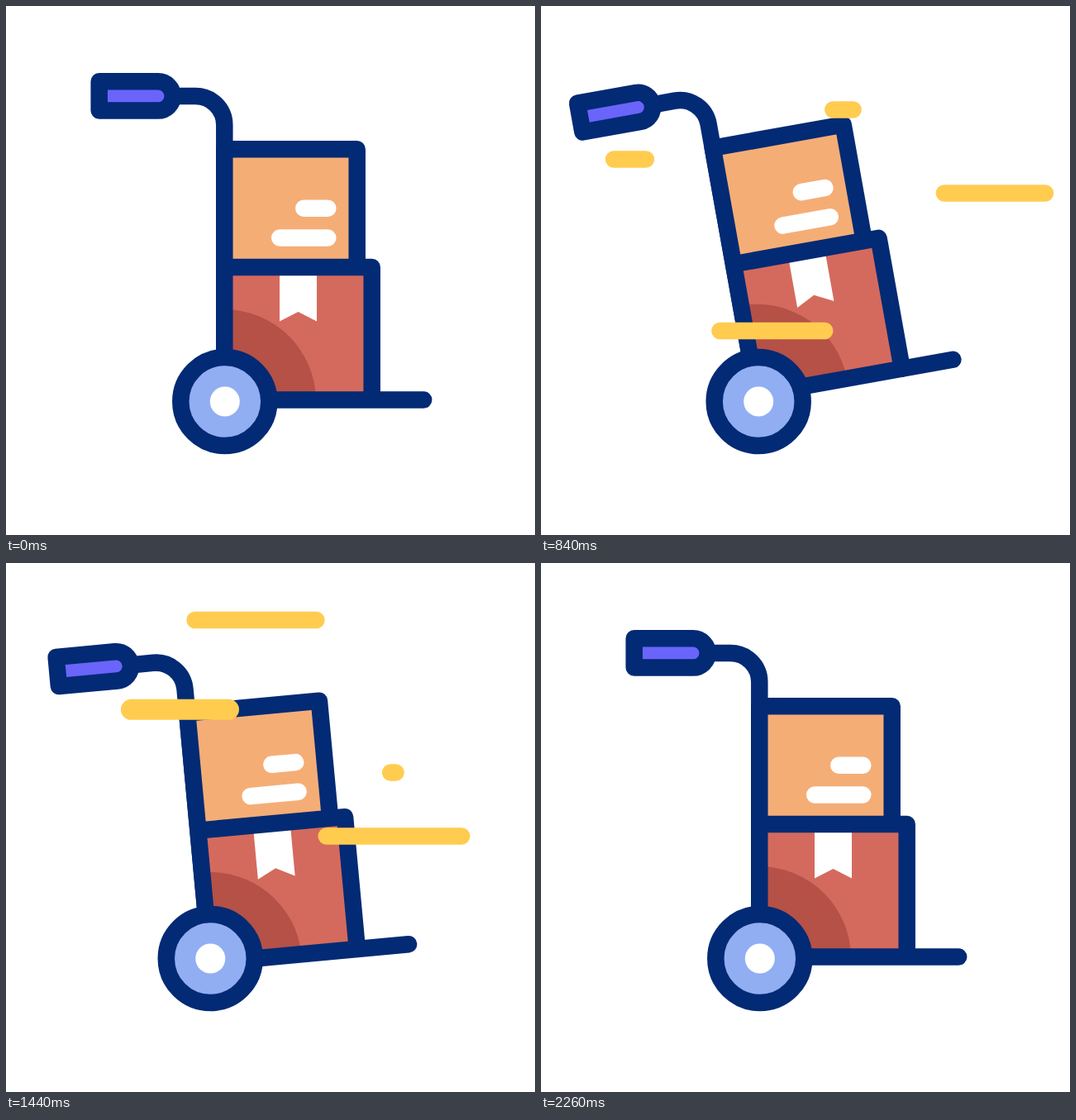
Write an HTML page that moves like this. It is 640 px wide and 640 px high and loops after 2400 ms.

```html
<!DOCTYPE html>
<html lang="en">
<head>
<meta charset="utf-8">
<title>Hand truck</title>
<style>
  html, body { margin: 0; height: 100%; overflow: hidden; background: #fff; }
  svg { display: block; width: 100%; height: 100%; }
  .outline { stroke: #032a74; stroke-width: 20.5; stroke-linecap: round; stroke-linejoin: round; }
  .label { stroke: #fff; stroke-width: 20.5; stroke-linecap: round; }
  #streaks { stroke: #ffcc50; stroke-linecap: round; }
</style>
</head>
<body>
<svg viewBox="0 0 640 640">
  <g id="cart" fill="none">
    <path class="outline" d="M211 109H229A35 35 0 0 1 264.3 144V440"/>
    <path class="outline" fill="#6a64fb" d="M112.7 91.2H184A17.7 17.7 0 0 1 184 126.6H112.7Z"/>
    <path fill="#f5ad76" d="M264.3 173.3H424.7V316H264.3Z"/>
    <path class="label" d="M360.3 244.7H389.3M331.2 280.5H389.3"/>
    <path fill="#d46a5d" d="M264.3 316H442.7V476.5H264.3Z"/>
    <path fill="#b55147" d="M264.3 367A111 111 0 0 1 375 476.5H264.3Z"/>
    <path fill="#fff" d="M331 316H376V381.5L353.5 370L331 381.5Z"/>
    <path class="outline" d="M264.3 173.3H424.7V316M264.3 316H442.7V476.5M264.3 173.3V476.5H505.2"/>
  </g>
  <g id="wheel">
    <circle class="outline" r="53.5" fill="#91aef2"/>
    <circle r="18" fill="#fff"/>
  </g>
  <g id="streaks"></g>
</svg>
<script>
const LOOP = 2400, AXLE_X = 264.8, AXLE_Y = 478.5;
const STREAK_LENGTH = 202, TAIL_DELAY = 250;
const cart = document.getElementById('cart');
const wheel = document.getElementById('wheel');
const streakLayer = document.getElementById('streaks');

// Turning points: [ms, value]
const roll = [[0, AXLE_X], [580, 220.5], [1060, 295.6], [1640, 230], [2220, AXLE_X]];
const bounce = [[0, 0], [460, 11], [1010, -11.3], [1400, 7.5], [1740, -8], [2220, 0]];

const ramp = (t, from, to) => Math.min(1, Math.max(0, (t - from) / (to - from)));
const ease = p => (1 - Math.cos(Math.PI * p)) / 2;

// Swing from each turning point to the next
function swing(points, t) {
  return points.slice(1).reduce(
    (sum, [time, value], i) => sum + (value - points[i][1]) * ease(ramp(t, points[i][0], time)),
    points[0][1]);
}

// Tip back, hold, then settle with a long tail
function tilt(t) {
  return 10.15 * (ease(ramp(t, 0, 850) ** 0.9) - ease(ramp(t, 1030, 2220) ** 0.68));
}

// y, right end, start, travel time, thickness
const streaks = [
  [125.5, 555.3, 258, 430],
  [185.5, 290, 264, 460],
  [393, 396, 398, 565],
  [226.5, 612, 560, 490],
  [69, 379, 1154, 433],
  [177.3, 273, 1147, 520, 25],
  [330.5, 562, 1130, 410],
  [253.5, 471.5, 1390, 450]
].map(([y, right, start, travel, width = 20.5]) => {
  const el = document.createElementNS('http://www.w3.org/2000/svg', 'path');
  el.setAttribute('stroke-width', width);
  streakLayer.append(el);
  return { el, y, right, start, travel };
});

function draw(t) {
  const x = swing(roll, t);
  wheel.setAttribute('transform', `translate(${x} ${AXLE_Y})`);
  cart.setAttribute('transform',
    `translate(${x} ${AXLE_Y}) rotate(${-tilt(t)}) translate(${-AXLE_X} ${swing(bounce, t) - AXLE_Y})`);

  for (const { el, y, right, start, travel } of streaks) {
    const tailStart = start + TAIL_DELAY;
    const visible = t >= start && t < tailStart + travel;
    const end = from => right - STREAK_LENGTH * ease(ramp(t, from, from + travel));
    el.setAttribute('d', visible ? `M${end(start)} ${y}H${end(tailStart) + 0.01}` : '');
  }
}

const begin = performance.now();
function tick() {
  draw((performance.now() - begin) % LOOP);
  requestAnimationFrame(tick);
}
tick();
</script>
</body>
</html>
```
